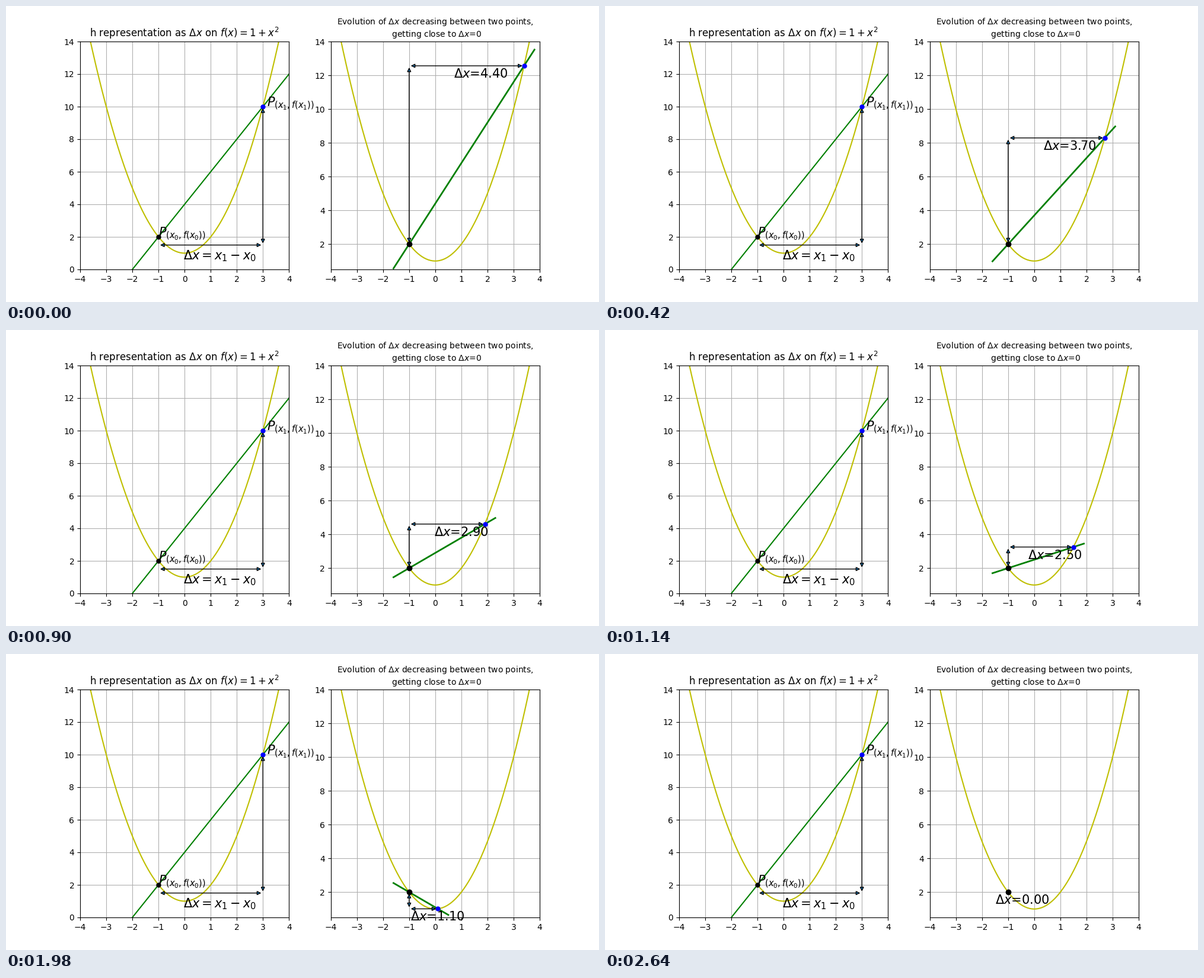
A matplotlib script for the animation above (2700 ms loop, 1000x500 px).

```python
import numpy as np
import matplotlib.pyplot as plt
from matplotlib.animation import FuncAnimation

FRAMES = 45
INTERVAL = 60
X0 = -1.0
STEP = 0.1

plt.rcParams["font.family"] = "DejaVu Sans"


def f(x):
    return 1 + x**2


def double_arrow(ax, start, end):
    return ax.annotate("", xy=end, xytext=start,
                       arrowprops=dict(arrowstyle="<|-|>"))


def move_arrow(arrow, start, end):
    arrow.set_position(start)
    arrow.xy = end


def setup(ax, bottom):
    x = np.linspace(-4, 4, 200)
    ax.plot(x, f(x), "y")
    ax.set_xlim(-4, 4)
    ax.set_ylim(bottom, 14)
    ax.grid(True)


fig, (left, right) = plt.subplots(1, 2, figsize=(10, 5), dpi=100)

# Static definition of the secant
setup(left, 0)
left.set_title(r"h representation as $\Delta x$ on $f(x)=1+x^2$")
left.plot([-2, 4], [0, 12], "g")
left.plot(X0, f(X0), "ko", markersize=5)
left.plot(3, f(3), "bo", markersize=5)
double_arrow(left, (X0, 1.5), (3, 1.5))
double_arrow(left, (3, 1.5), (3, f(3)))
left.text(X0, 2, r"$P_{(x_0,f(x_0))}$", fontsize=15)
left.text(3.15, 10, r"$P_{(x_1,f(x_1))}$", fontsize=15)
left.text(-0.05, 0.6, r"$\Delta x=x_1-x_0$", fontsize=15)

# Secant closing in on the tangent point
setup(right, 0.5)
right.set_title("Evolution of $\\Delta x$ decreasing between two points,\n"
                " getting close to $\\Delta x$=0", fontsize=10)
secant, = right.plot([], [], "g", linewidth=2)
moving, = right.plot([], [], "bo", markersize=5)
right.plot(X0, f(X0), "ko", markersize=6)
run = double_arrow(right, (X0, 2), (3, 2))
rise = double_arrow(right, (X0, 2), (X0, 3))
label = right.text(0, 0, "", fontsize=15)


def update(i):
    dx = (FRAMES - 1 - i) * STEP
    x1 = X0 + dx
    y1 = f(x1)
    apart = i < FRAMES - 1

    ends = np.array([X0 - 0.6, x1 + 0.4])
    secant.set_data(ends, f(X0) + (X0 + x1) * (ends - X0))
    moving.set_data([x1], [y1])
    move_arrow(run, (X0, y1), (x1, y1))
    move_arrow(rise, (X0, f(X0)), (X0, y1))
    for artist in (secant, run):
        artist.set_visible(apart)
    rise.set_visible(abs(y1 - f(X0)) > 1e-9)

    label.set_position(((X0 + x1) / 2 - 0.5, y1 - 0.7))
    label.set_text(rf"$\Delta x$={dx:.2f}")
    return secant, moving, run, rise, label


anim = FuncAnimation(fig, update, frames=FRAMES, interval=INTERVAL,
                     repeat=True, repeat_delay=0)
plt.show()
```
